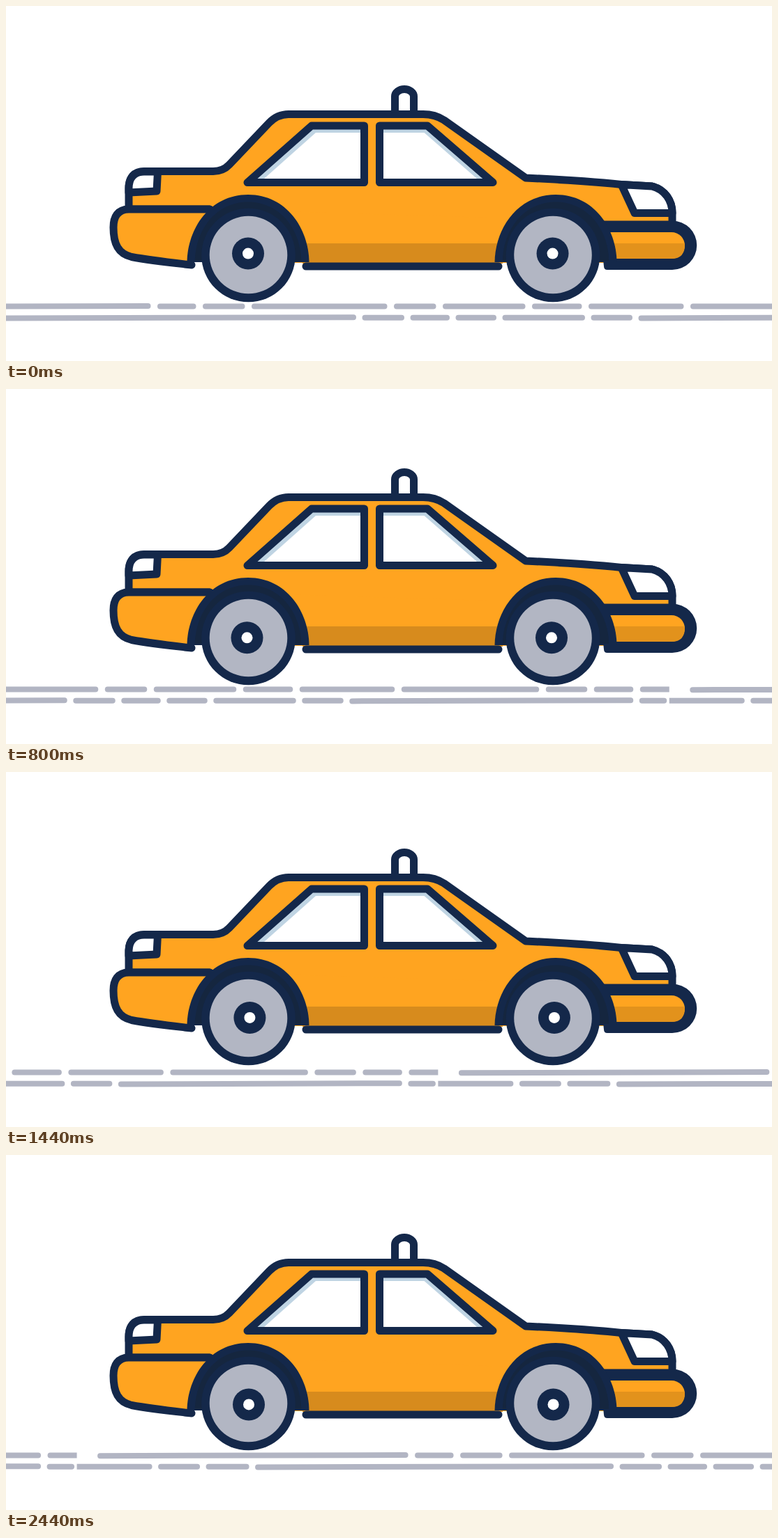
Animation of 1098 by 510 pixels, one loop 2.48 s. Source, as an HTML page:

```html
<!DOCTYPE html>
<html lang="en">
<head>
<meta charset="utf-8">
<title>Taxi ride</title>
<style>
  html, body { margin: 0; width: 100%; height: 100%; overflow: hidden; background: #fff; }
  svg { display: block; width: 100vw; height: 100vh; }
  .line { stroke: #14284a; stroke-width: 11; stroke-linecap: round; stroke-linejoin: round; }
  .navy { fill: #14284a; }
  .orange { fill: #ffa420; }
  .white { fill: #fff; }
  .glass { fill: #bfd4e3; }
  .shade { fill: #d78b1d; }
  .grey { fill: #b2b6c3; }
  .well { fill: #15263f; }
  #strip { stroke: #b2b5c3; stroke-width: 8; stroke-linecap: round; }
</style>
</head>
<body>
<svg viewBox="0 0 1098 510" xmlns="http://www.w3.org/2000/svg">
  <defs>
    <clipPath id="stripEdge"><rect y="420" width="1632.5" height="40"/></clipPath>
    <g id="strip" clip-path="url(#stripEdge)"></g>
    <path id="arch" d="M-87.500 0C-87 -48 -55 -97 0 -97S87 -48 87.500 0Z"/>
    <g id="wheel">
      <circle class="navy" r="67.3" cy=".5"/>
      <circle class="grey" r="55.8"/>
      <g class="hub">
        <circle class="navy" r="23"/>
        <circle class="white" r="8"/>
      </g>
    </g>
  </defs>

  <use href="#strip" class="road"/>
  <use href="#strip" class="road"/>

  <g id="car">
    <!-- roof lamp -->
    <path class="line white" stroke-linecap="butt" style="stroke-linecap:butt" d="M557.500 152V130A13.500 10.500 0 0 1 584.500 130V152"/>

    <!-- body -->
    <rect class="orange" x="290" y="285" width="570" height="84"/>
    <rect class="shade" x="425" y="341" width="287" height="29"/>
    <path class="line orange" d="M292 292H176V262C176 246 184 237.500 198 237.500H297Q311 237.500 320 228L377 168Q389 155.500 405 155.500H598Q615 155.500 628 164L745 247Q830 251 882 256.500L926 259C945 264 955 280 955 297V312"/>
    <path class="line orange" d="M292 292H176C160 292 154 303 154 318C154 342 161 356 180 360.500C210 366 240 369 266 372"/>
    <path class="line" d="M430 374H706"/>

    <!-- lamps -->
    <path class="line white" d="M176 268V262C176 246 184 238 198 238H217.500L216 266Z"/>
    <path class="line white" d="M882 256.500L926 259C945 264 955 280 955 297.500H901Z"/>

    <!-- front bumper -->
    <path class="navy" d="M850 308.500H955A35 35 0 0 1 955 379H862Q857 379 857 374Z"/>
    <path class="orange" d="M866 325H954A19 19 0 0 1 954 363H866Z"/>
    <path fill="#e2921c" d="M866 341H973Q974 363 954 363H866Z"/>

    <!-- wheels and arches -->
    <use href="#arch" class="navy" x="347" y="368"/>
    <use href="#arch" class="navy" x="788" y="368"/>
    <use href="#arch" class="well" transform="translate(347 366) scale(.87)"/>
    <use href="#arch" class="well" transform="translate(788 366) scale(.87)"/>
    <use href="#wheel" x="347.5" y="357.5"/>
    <use href="#wheel" x="784" y="357.5"/>

    <!-- windows -->
    <path class="line glass" d="M346 253.500L438 172H513.500V253.500Z"/>
    <path class="white" d="M370 248L444 182H508V248Z"/>
    <path class="line glass" d="M535.500 172H604L698 253.500H535.500Z"/>
    <path class="white" d="M541 182H599.500L675 248H541Z"/>
  </g>
</svg>
<script>
  const LOOP = 2480, STEP = 40;
  const STRIP = 1632.5, ROAD_SPEED = 0.5178, ROAD_START = 1365;
  const BOB_PERIOD = 400, BOB_HEIGHT = 5;
  const SPIN = 0.811, SPIN_START = -104, WOBBLE = 2;

  const strip = document.getElementById('strip');
  const car = document.getElementById('car');
  const roads = document.querySelectorAll('.road');
  const hub = document.querySelector('.hub');

  // Lays dashes end to end; long ones lean slightly.
  function addLane(y, x, gap, pitches) {
    for (const pitch of pitches) {
      const length = pitch - gap;
      const lean = length > 400 ? 0.6 : 0;
      const line = document.createElementNS('http://www.w3.org/2000/svg', 'line');
      const attrs = { x1: x + 4, y1: y + lean, x2: x + length - 4, y2: y - lean };
      for (const key in attrs) line.setAttribute(key, attrs[key]);
      strip.append(line);
      x += pitch;
    }
  }

  const move = (node, x, y) => node.setAttribute('transform', `translate(${x} ${y})`);

  function draw(time) {
    const t = Math.floor((time % LOOP) / STEP) * STEP;
    const seam = ROAD_START - ROAD_SPEED * t;
    roads.forEach((road, i) => move(road, seam - i * STRIP, 0));

    const phase = (t % BOB_PERIOD) / BOB_PERIOD;
    move(car, 0, -BOB_HEIGHT * (1 - Math.abs(1 - 2 * phase)));

    const angle = (SPIN_START + SPIN * t) * Math.PI / 180;
    move(hub, WOBBLE * Math.cos(angle), WOBBLE * Math.sin(angle));
  }

  addLane(431.6, 29.5, 9.5, [455, 65, 70, 204, 70, 128, 81, 146, 207, 69, 66, 70]);
  addLane(447.8, -20, 8.5, [136.5, 68.5, 70.5, 522.5, 69, 65, 67, 127, 68, 415.5, 48]);

  const start = performance.now();
  function tick() {
    draw(performance.now() - start);
    requestAnimationFrame(tick);
  }
  tick();
</script>
</body>
</html>
```
